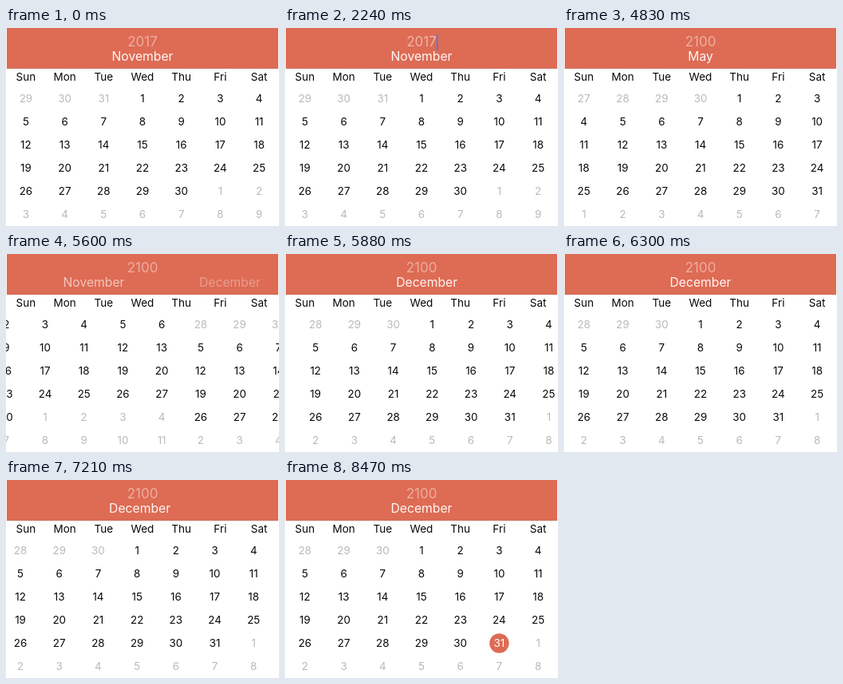
Write an HTML page with a canvas that moves like this. It is 342x248 px and loops after 9310 ms.

```html
<!DOCTYPE html>
<html lang="en">
<head>
<meta charset="utf-8">
<style>
  html, body { margin: 0; width: 100%; height: 100%; overflow: hidden; background: #fff; }
  canvas { display: block; }
</style>
</head>
<body>
<canvas id="stage" width="342" height="248"></canvas>
<script>
const ctx = document.getElementById('stage').getContext('2d');
const LOOP = 9310, PAGE = 341, COLUMN = 48.7, ROW = 29, CENTER = 171;
const ACCENT = '#de6b54';
const MONTHS = ['January', 'February', 'March', 'April', 'May', 'June', 'July',
  'August', 'September', 'October', 'November', 'December'];
const WEEKDAYS = ['Sun', 'Mon', 'Tue', 'Wed', 'Thu', 'Fri', 'Sat'];
const YEAR_EDITS = [[0, '2017'], [2870, '201'], [3290, '20'], [3500, '2'],
  [3710, '21'], [4340, '210'], [4620, '2100']];
const EDIT_START = 2240, EDIT_END = 4620, TAP = 8120;

// Pages are counted in months from November 2017
const TARGET = 83 * 12, LAST = TARGET + 1;

const columnX = column => CENTER + (column - 3) * COLUMN;
const rowY = row => 93 + row * ROW;
const progress = (t, from, to) => Math.min(1, Math.max(0, (t - from) / (to - from)));

function text(value, x, y, size, color) {
  ctx.font = `${size}px Inter, sans-serif`;
  ctx.fillStyle = color;
  ctx.fillText(value, x, y);
}

function overscroll(t) {
  const release = 6810, peak = 122;
  if (t < release) return peak * Math.sin(progress(t, 6540, release) * Math.PI / 2);
  if (t >= 7350) return 0;
  const s = (t - release) * 0.0115;
  return peak * (1 + s) * Math.exp(-s);
}

function position(t) {
  if (t < 5600) {
    const u = progress(t, 4620, 5040);
    return TARGET * u * u * (3 - 2 * u);
  }
  if (t < 6090) return LAST - 219 / PAGE * Math.exp(-(t - 5600) / 100);
  return LAST + overscroll(t) / PAGE;
}

function drawYear(t) {
  const year = YEAR_EDITS.filter(([start]) => start <= t).pop()[1];
  const editing = t >= EDIT_START && t < EDIT_END;
  text(year, CENTER, 23, 17, `rgba(255,255,255,${editing ? 0.5 : 0.45})`);
  if (!editing) return;
  ctx.fillStyle = '#5b76dc';
  ctx.fillRect(CENTER + ctx.measureText(year).width / 2, 8, 1.8, 20);
}

function drawSelection(t, x, y) {
  const grow = progress(t, TAP, TAP + 110), settle = progress(t, TAP + 110, TAP + 180);
  ctx.fillStyle = ACCENT;
  ctx.beginPath();
  ctx.arc(x, y - 4.5, 12.2 * (0.4 + 0.68 * grow - 0.08 * settle), 0, Math.PI * 2);
  ctx.fill();
}

function drawMonth(t, index, offset) {
  const first = new Date(2017, 10 + index, 1);
  const month = first.getMonth(), year = first.getFullYear(), lead = first.getDay();
  const alpha = Math.max(0, 1 - Math.abs(offset));
  text(MONTHS[month], CENTER + offset * PAGE / 2, 41, 15.7, `rgba(255,255,255,${0.95 * alpha})`);

  for (let cell = 0; cell < 42; cell++) {
    const day = new Date(year, month, 1 + cell - lead);
    const x = columnX(cell % 7) + offset * PAGE, y = rowY(Math.floor(cell / 7));
    const inMonth = day.getMonth() === month;
    const selected = t >= TAP && inMonth && day.getDate() === 31;
    if (selected) drawSelection(t, x, y);
    text(day.getDate(), x, y, 13.4, selected ? '#fff' : inMonth ? '#080808' : '#b9b9b9');
  }
}

function draw(now) {
  const t = now % LOOP;
  ctx.fillStyle = '#fff';
  ctx.fillRect(0, 0, 342, 248);
  ctx.fillStyle = ACCENT;
  ctx.fillRect(1, 0, 340, 50);
  ctx.fillStyle = '#c9705c';
  ctx.fillRect(1, 50, 340, 1);

  ctx.textAlign = 'center';
  drawYear(t);
  WEEKDAYS.forEach((name, i) => text(name, columnX(i), 66, 13.5, '#080808'));

  const p = position(t), base = Math.floor(p);
  for (let index = base; index <= Math.min(base + 1, LAST); index++) drawMonth(t, index, index - p);
}

let start;
function tick(now) {
  start ??= now;
  draw(now - start);
  requestAnimationFrame(tick);
}
requestAnimationFrame(tick);
</script>
</body>
</html>
```
